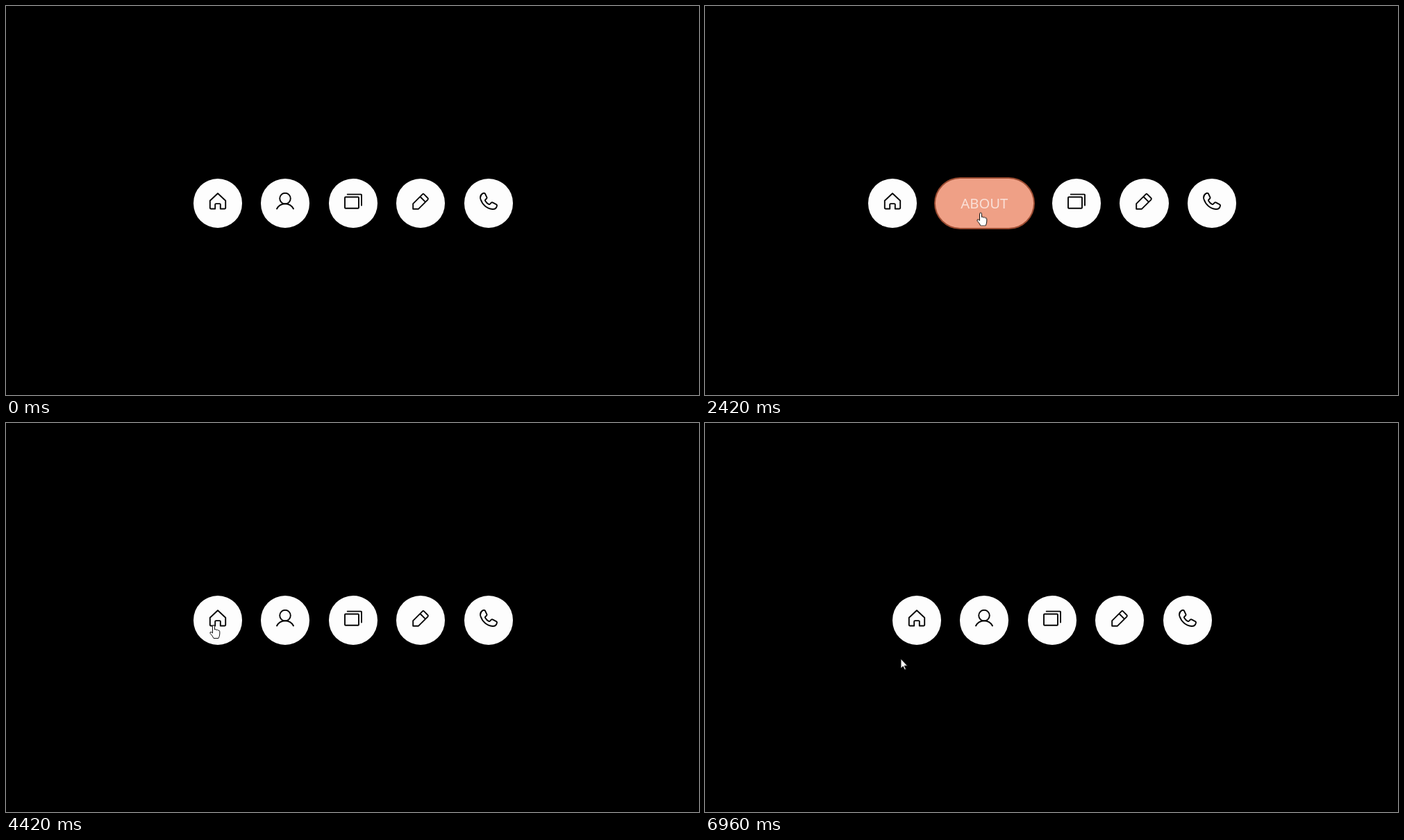
An HTML page that plays this animation: 998 by 561 pixels, repeating every 7000 ms.

```html
<!DOCTYPE html>
<html lang="en">
<head>
<meta charset="utf-8">
<title>Icon menu</title>
<style>
@property --p { syntax: "<number>"; inherits: true; initial-value: 0; }

html, body { margin: 0; width: 100%; height: 100%; overflow: hidden; background: #000; }

.menu {
  position: absolute; left: 0; top: 249.4px; width: 999.6px;
  display: flex; justify-content: center; gap: 27.3px;
  margin: 0; padding: 0; list-style: none;
}
.menu li {
  position: relative; flex: none;
  width: calc(70.2px + 105.3px * var(--p)); height: 70.2px;
  border-radius: 36px; background: #fdfdfd;
}
.menu li::after {
  content: ""; position: absolute; inset: -2px;
  border-radius: 38px; background: var(--c, none); opacity: var(--p);
}
.menu svg {
  position: absolute; left: calc(50% - 15px); top: calc(50% - 15px);
  width: 30px; height: 30px;
  fill: none; stroke: #050505; stroke-width: 1.9; stroke-linejoin: round; stroke-linecap: round;
  opacity: calc(1 - 2.2 * var(--p));
}
.menu span {
  position: absolute; z-index: 1; left: 50%; top: calc(50% - .6px);
  transform: translate(-50%, -50%);
  font: 20.3px/1 "Noto Sans", "Open Sans", sans-serif;
  color: #fff; white-space: nowrap; opacity: var(--p);
}

/* --p runs from 0 (round) to 1 (open pill) */
li.home { --c: #869b00; animation: home 7s infinite; }
li.about { --c: #e9734b; animation: about 7s infinite; }
li.projects { --c: #c01e38; animation: projects 7s infinite; }

@keyframes projects {
  0% { --p: 0; }
  4.74% { --p: 0; animation-timing-function: cubic-bezier(.1, .7, .3, 1); }
  11.9% { --p: 1; }
  20.43% { --p: 1; animation-timing-function: ease; }
  27.57%, 100% { --p: 0; }
}
@keyframes about {
  0% { --p: 0; }
  33.14% { --p: 0; animation-timing-function: cubic-bezier(.1, .7, .3, 1); }
  40.29% { --p: 1; }
  52% { --p: 1; animation-timing-function: ease; }
  59.14%, 100% { --p: 0; }
}
@keyframes home {
  0% { --p: 0; }
  63.21% { --p: 0; animation-timing-function: ease; }
  70.36% { --p: 1; }
  86.03% { --p: 1; animation-timing-function: ease; }
  93.17%, 100% { --p: 0; }
}

.cursor {
  position: absolute; left: 0; top: 0; width: 1px; height: 1px; overflow: visible;
  fill: #fff; stroke: #111; stroke-width: 1; stroke-linejoin: round;
  animation: travel 7s linear infinite, appear 7s step-end infinite;
}
.hand { animation: hand 7s step-end infinite; }
.arrow { animation: arrow 7s step-end infinite; }

@keyframes appear { 0% { opacity: 0; } 4.86%, 100% { opacity: 1; } }
@keyframes hand {
  0% { opacity: 1; } 15.5% { opacity: 0; }
  23.7% { opacity: 1; } 45.8% { opacity: 0; }
  54.5% { opacity: 1; } 78.6%, 100% { opacity: 0; }
}
@keyframes arrow {
  0% { opacity: 0; } 15.5% { opacity: 1; }
  23.7% { opacity: 0; } 45.8% { opacity: 1; }
  54.5% { opacity: 0; } 78.6%, 100% { opacity: 1; }
}
@keyframes travel {
  0%, 15% { transform: translate(492px, 299px); }
  16.14%, 20.86% { transform: translate(508px, 382px); }
  21.86% { transform: translate(472px, 381px); }
  22.71% { transform: translate(427px, 362px); }
  24.57%, 44.2% { transform: translate(397px, 298.5px); }
  45.1% { transform: translate(399px, 289px); }
  47.71%, 49.8% { transform: translate(395px, 401px); }
  51.4%, 52.2% { transform: translate(381.5px, 400px); }
  55%, 77% { transform: translate(299px, 292px); }
  81.57%, 100% { transform: translate(282px, 340px); }
}
</style>
</head>
<body>
<ul class="menu">
  <li class="home">
    <svg viewBox="-15 -15 30 30"><path d="M-11.2-3.3 0-13.8 11.2-3.3V7.3q0 1.2-1.2 1.2H3.8V2.3q0-1.2-1.2-1.2H-2.6q-1.2 0-1.2 1.2V8.5H-10q-1.2 0-1.2-1.2Z"/></svg>
    <span>HOME</span>
  </li>
  <li class="about">
    <svg viewBox="-15 -15 30 30"><circle cy="-6.4" r="7.8"/><path d="M-12 8.5A13.5 13.5 0 0 1 12 8.5"/></svg>
    <span>ABOUT</span>
  </li>
  <li class="projects">
    <svg viewBox="-15 -15 30 30"><rect x="-12" y="-8.5" width="20" height="16.2" rx="1"/><path d="M-8.3-12.4H11.2q.8 0 .8.8V3.5"/></svg>
    <span>PROJECTS</span>
  </li>
  <li>
    <svg viewBox="-15 -15 30 30"><path d="M-10.8 8.8V1.2L2.7-12.3q1.2-1.2 2.4 0L10.4-7q1.1 1.2 0 2.3L-3.2 8.8ZM-.6-9 7-1.4"/></svg>
  </li>
  <li>
    <svg viewBox="-15 -15 30 30"><path d="M-8.5-13.6C-11.8-11.6-12.6-9-11.5-5.2-9 2.5-2.5 8.2 5.5 9 9 9.3 11.3 7.3 12 4.2 12.2 3.2 11.8 2.6 11 2.1L5.8-.6C4.9-1 4.2-.8 3.6-.2L2 1.6C1.5 2.1.9 2.1.2 1.8-2 .8-3.6-.8-4.8-3-5.2-3.7-5-4.3-4.5-4.8L-3-6.2C-2.4-6.8-2.3-7.4-2.6-8.2L-4.9-13C-5.8-14.6-7.2-14.5-8.5-13.6Z"/></svg>
  </li>
</ul>
<svg class="cursor">
  <path class="arrow" d="M0 0V14L3.2 11 5.5 16 7.5 15.2 5.2 10.2H9.6Z"/>
  <path class="hand" d="M-1.5 1.2Q-1.5-.2 0-.2T1.5 1.2V6Q3 5 4 6.4 5.5 5.6 6.4 7 8.6 6.6 8.8 8.8V12Q8.8 15 7 18.5H0Q-1.5 15-4.8 11.5-5.8 9.6-4 9.4-2.6 9.6-1.5 11Z"/>
</svg>
</body>
</html>
```
